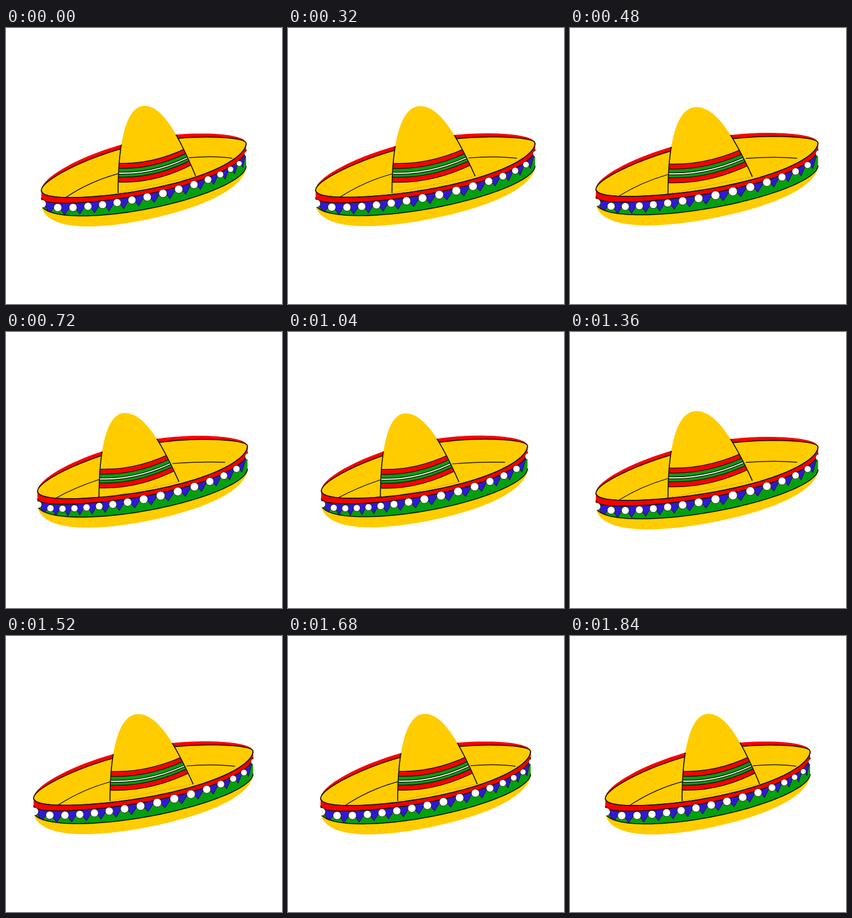
Write an HTML page with a canvas that moves like this. It is 500 px wide and 500 px high and loops after 1920 ms.

```html
<!DOCTYPE html>
<html lang="en">
<head>
<meta charset="utf-8">
<title>Swaying sombrero</title>
<style>
html, body { margin: 0; width: 100%; height: 100%; overflow: hidden; background: #fff; }
canvas { display: block; width: 500px; height: 500px; }
</style>
</head>
<body>
<canvas id="stage" width="500" height="500"></canvas>
<script>
const ctx = document.getElementById('stage').getContext('2d');
const YELLOW = '#ffcc00', RED = '#fa0000', GREEN = '#02a010', BLUE = '#2e1ad4', INK = '#1c1600';
const STEP = 80, POSES = 12, BEADS = 16;

// Each brim edge is a skewed half ellipse: height of its middle, tilt of its
// long axis, and depth with corrections along the axis.
const EDGES = {
  backOut: { mid: 251.7, tilt: 42, depth: -50, skew: 5, bulge: 8 },
  backIn: { mid: 252, tilt: 42.5, depth: -43, skew: 5, bulge: 11 },
  frontTop: { mid: 251.7, tilt: 42.5, depth: 42, skew: 8.5, bulge: 0 },
  redLow: { mid: 264, tilt: 43.5, depth: 38, skew: 9, bulge: 0 },
  beadLine: { mid: 271.5, tilt: 43.5, depth: 36, skew: 5, bulge: 0 },
  greenLow: { mid: 284, tilt: 34, depth: 45, skew: 0, bulge: 0 },
  bottom: { mid: 284, tilt: 34, depth: 64, skew: -3, bulge: 8 }
};

// c runs from -1 at the left tip to 1 at the right tip
function edgeY(edge, c, sink) {
  const s = Math.sqrt(1 - c * c);
  return edge.mid - edge.tilt * c + s * (edge.depth + edge.skew * c + edge.bulge * c * c)
    - sink * (1.2 - 0.5 * c);
}

function polyline(pts) {
  const path = new Path2D();
  pts.forEach(pt => path.lineTo(...pt));
  return path;
}

function between(top, low) {
  const path = polyline([...top, ...[...low].reverse()]);
  path.closePath();
  return path;
}

function curve(x0, y0, cx, cy, x1, y1) {
  const path = new Path2D();
  path.moveTo(x0, y0);
  path.quadraticCurveTo(cx, cy, x1, y1);
  return path;
}

function fill(path, color) {
  ctx.fillStyle = color;
  ctx.fill(path);
}

function line(path, width = 1.8) {
  ctx.strokeStyle = INK;
  ctx.lineWidth = width;
  ctx.stroke(path);
}

function clipped(path, draw) {
  ctx.save();
  ctx.clip(path);
  draw();
  ctx.restore();
}

function drawCrown(ax, ay, lx, ly, rx, ry, ring) {
  const wl = ax - lx, wr = rx - ax;
  const crown = new Path2D();
  crown.moveTo(lx, ly);
  crown.bezierCurveTo(lx, ly - 62, ax - 0.85 * wl, ay, ax, ay);
  crown.bezierCurveTo(ax + 0.35 * wr, ay, rx - 0.34 * wr, ry - 75, rx, ry);
  fill(crown, YELLOW);

  const stripeEdge = o => curve(lx, ly - 54 + o, (lx + rx) / 2, ly - 51 + o, rx, ry - 59 + o * 1.03);
  const stripes = [[0, RED], [9, GREEN], [16, '#fff'], [19.5, GREEN], [25, RED], [34, YELLOW]];
  clipped(crown, () => {
    // Every stripe covers all below it, down to the next one
    for (const [o, color] of stripes) {
      const area = stripeEdge(o);
      area.lineTo(rx, ry);
      area.lineTo(lx, ly);
      fill(area, color);
      line(stripeEdge(o), 1.5);
    }
  });
  clipped(ring, () => line(crown));
}

function drawHat(pose) {
  const turn = Math.cos(Math.PI * pose / (POSES - 1));
  const wide = 1 - turn * turn;
  const sink = (1 - turn) ** 2;
  const half = 185.5 + 16 * wide, center = 248.3 + 1.2 * turn;

  const yAt = (name, x) => {
    const c = Math.max(-1, Math.min(1, (x - center) / half));
    return edgeY(EDGES[name], c, sink);
  };
  const edge = {};
  for (const name in EDGES) {
    edge[name] = Array.from({ length: 61 }, (_, i) => {
      const x = center - half * Math.cos(Math.PI * i / 60);
      return [x, yAt(name, x)];
    });
  }
  const beadX = i => {
    const v = i / (BEADS - 1), a = Math.PI * v;
    return center + 1.5 + half * (2 * v - 1)
      + (5 + 18 * turn) * Math.sin(a) - 9 * Math.sin(2 * a) + 4 * Math.sin(3 * a);
  };
  const onBeads = (i, dy) => [beadX(i), yAt('beadLine', beadX(i)) + dy];

  ctx.fillStyle = '#fff';
  ctx.fillRect(0, 0, 500, 500);
  ctx.lineJoin = 'round';

  // Lower side of the brim with its zigzag band
  fill(between(edge.redLow, edge.bottom), YELLOW);
  const band = between(edge.redLow, edge.greenLow);
  fill(band, GREEN);
  clipped(band, () => {
    for (let i = -1; i < BEADS; i++) {
      const flag = polyline([onBeads(i - 0.05, -7), onBeads(i + 0.45, 13), onBeads(i + 0.95, -7)]);
      fill(flag, BLUE);
      line(flag, 1);
    }
  });
  line(polyline(edge.greenLow));

  // Upper side of the brim
  const ring = between(edge.backOut, edge.redLow);
  fill(ring, RED);
  const inside = between(edge.backIn, edge.frontTop);
  fill(inside, YELLOW);
  line(inside);

  const lx = 185 + 18 * turn - 5 * wide, ly = 299 + sink;
  const rx = 326 + 17.5 * turn + 7 * wide, ry = 268 + sink;
  const seamL = 100 + 8 * turn - 11 * wide, seamR = 401 + 9 * turn + 12 * wide;
  line(curve(seamL, yAt('frontTop', seamL), (seamL + lx) / 2 - 4, ly - 21, lx, ly - 35), 1.4);
  line(curve(rx - 12, ry - 33, (rx + seamR) / 2, ry - 37, seamR, 236), 1.4);
  drawCrown(231.5 + 19.5 * turn, 141 + 1.7 * sink, lx, ly, rx, ry, ring);

  // Front rim and beads
  fill(between(edge.frontTop, edge.redLow), RED);
  line(polyline(edge.frontTop));
  line(polyline(edge.redLow));
  const hull = between(edge.backOut, edge.bottom);
  for (let i = 0; i < BEADS; i++) {
    const gap = beadX(i + 0.5) - beadX(i - 0.5);
    const bead = new Path2D();
    bead.arc(...onBeads(i, 0), 2.5 + 0.17 * gap, 0, 2 * Math.PI);
    fill(bead, '#fff');
    clipped(hull, () => line(bead, 0.8));
  }
}

// Sway one way, then back through the same poses
const start = performance.now();
let shown = -1;
function tick() {
  const k = Math.floor((performance.now() - start) / STEP) % (2 * POSES);
  const pose = Math.min(k, 2 * POSES - 1 - k);
  if (pose !== shown) drawHat(shown = pose);
  requestAnimationFrame(tick);
}
tick();
</script>
</body>
</html>
```
